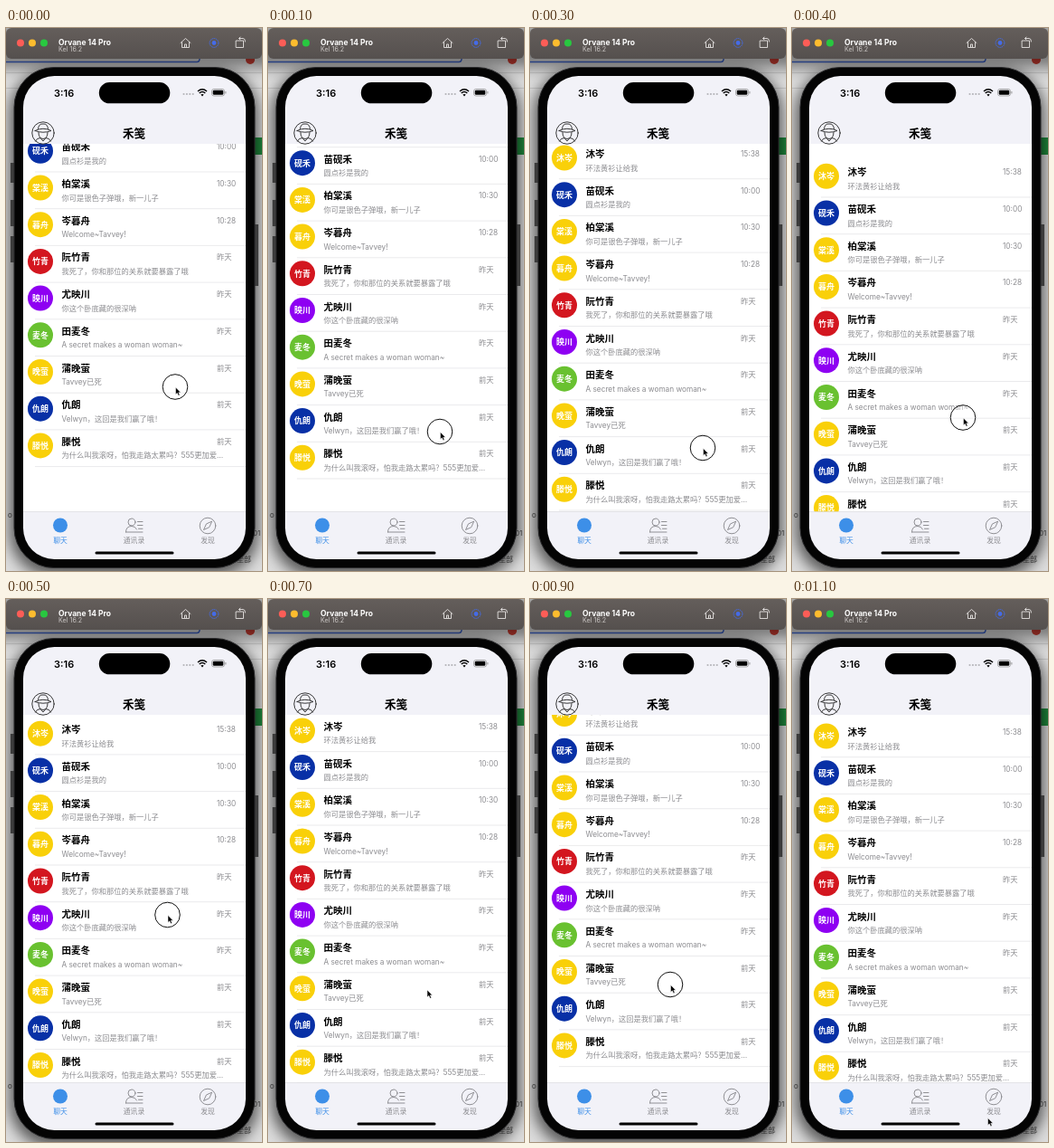
An HTML page for the animation above (1.2 s loop, 283 px wide and 600 px high).

```html
<!DOCTYPE html>
<html lang="zh-CN">
<head>
<meta charset="utf-8">
<style>
html, body { margin: 0; width: 100%; height: 100%; overflow: hidden; background: #ddd; }
svg { display: block; width: 283px; height: 600px; font-family: Inter, "Noto Sans CJK SC", "Noto Sans CJK", sans-serif; }
.name { font-size: 10.5px; font-weight: 700; }
.note, .when { font-size: 8.25px; fill: #8b8b8f; }
.badge { font-size: 9px; font-weight: 700; fill: #fff; text-anchor: middle; }
.tab { font-size: 7.8px; text-anchor: middle; fill: #8e8e92; }
.line { fill: none; stroke-width: .9; stroke-linecap: round; stroke-linejoin: round; }
</style>
</head>
<body>
<svg viewBox="0 0 283 600">
  <defs>
    <filter id="blur" x="-20%" y="-50%" width="140%" height="200%"><feGaussianBlur stdDeviation="8"/></filter>
    <clipPath id="screen"><rect x="19" y="53" width="246" height="534" rx="34.5"/></clipPath>
    <clipPath id="view"><rect x="19" y="128" width="246" height="406.5"/></clipPath>
    <linearGradient id="bar" x2="0" y2="1"><stop stop-color="#645e5b"/><stop offset="1" stop-color="#55504e"/></linearGradient>
  </defs>

  <!-- desktop behind the phone -->
  <rect width="283" height="600" fill="#dcdcdc"/>
  <path d="M0 37.5H211Q214 37.5 214 34" fill="none" stroke="#3d63c9" stroke-width="1.5"/>
  <circle cx="270" cy="35" r="5" fill="#c0392f"/>
  <path d="M0 49.5H283M0 66.5H283" stroke="#c4c4c4"/>
  <rect x="274" y="121" width="9" height="19" fill="#1f8a3d"/>
  <rect x="-20" y="0" width="323" height="44" opacity=".45" filter="url(#blur)"/>
  <rect x="4" y="46" width="275" height="560" rx="48" opacity=".6" filter="url(#blur)"/>
  <g font-size="8" fill="#333">
    <text x="2" y="541">o</text>
    <text x="255" y="590">全部</text>
    <text x="273" y="561">01</text>
  </g>

  <!-- window bar -->
  <rect width="283" height="34" rx="6" fill="url(#bar)"/>
  <circle cx="16" cy="16.5" r="4" fill="#fc5d57"/>
  <circle cx="29" cy="16.5" r="4" fill="#fdbc2e"/>
  <circle cx="42" cy="16.5" r="4" fill="#28c840"/>
  <text x="58" y="18.5" font-size="8.5" font-weight="700" fill="#fff">Orvane 14 Pro</text>
  <text x="58" y="25.5" font-size="7.2" fill="#c9c5c3">Kel 16.2</text>
  <g class="line" stroke="#e6e3e1">
    <path d="M193 16.5L198.5 11.5L204 16.5M194.5 15.5V21.5H202.5V15.5M197.5 21V18H199.5V21"/>
    <path d="M254.5 14H262.5V21.5H254.5ZM257.5 11.5H262Q264.5 11.5 264.5 15M259 10L257.5 11.5L259 13"/>
  </g>
  <circle cx="230" cy="16.5" r="4.9" fill="none" stroke="#456be8" stroke-dasharray="1.6 .6"/>
  <circle cx="230" cy="16.5" r="2.4" fill="#456be8"/>

  <!-- phone body -->
  <path d="M7 149V171M7 190V219M7 230V259M277 217V285" stroke="#3c3c3c" stroke-width="4"/>
  <rect x="9" y="43.5" width="266" height="553" rx="44" fill="#040404" stroke="#2c2c2e"/>

  <g clip-path="url(#screen)">
    <rect x="19" y="53" width="246" height="534" fill="#f2f2f8"/>
    <rect x="19" y="128" width="246" height="406.5" fill="#fff"/>
    <g clip-path="url(#view)"><g id="list"></g></g>

    <!-- status and title -->
    <rect x="102.8" y="60" width="78.5" height="23.3" rx="11.6"/>
    <text x="53" y="75.5" font-size="11" font-weight="600">3:16</text>
    <g fill="#b4b4b9">
      <circle cx="196.5" cy="73" r="1.1"/><circle cx="199.9" cy="73" r="1.1"/>
      <circle cx="203.3" cy="73" r="1.1"/><circle cx="206.7" cy="73" r="1.1"/>
    </g>
    <path d="M212 70Q217 65.5 222 70M213.7 72Q217 69 220.3 72" fill="none" stroke="#000" stroke-width="1.5"/>
    <path d="M215.3 73.5Q217 72.3 218.7 73.5L217 75.5Z"/>
    <rect x="227.5" y="67.5" width="14" height="7.5" rx="2.3" fill="none" stroke="#999" stroke-width=".8"/>
    <rect x="228.7" y="68.7" width="11.6" height="5.1" rx="1.3"/>
    <path d="M242.9 70V72.5" stroke="#999"/>
    <text x="141.5" y="120.5" font-size="12.6" font-weight="700" text-anchor="middle">禾笺</text>
    <g class="line" stroke="#222">
      <circle cx="41" cy="116" r="12.2" fill="#f2f2f8"/>
      <path d="M32 113.5Q41 109 50 113.5Q41 117 32 113.5M35.5 111.5Q36 105.5 41 106Q46 105.5 46.5 111.5M36 115.5Q36 122 41 122.5Q46 122 46 115.5M32.5 125Q34 121.5 38 121.5L41 125L44 121.5Q48 121.5 49.5 125"/>
    </g>

    <!-- tabs -->
    <path d="M19 534.5H265" stroke="#d6d6da" stroke-width=".6"/>
    <circle cx="60" cy="549.5" r="8" fill="#3d8fe8"/>
    <g class="line" stroke="#858589">
      <circle cx="139" cy="546" r="4"/>
      <path d="M132.5 557Q132.5 550.5 139 550.5Q143 550.5 144.5 554M132.5 557H151M145.5 545.5H151M145.5 549.5H151M146.5 553.3H151"/>
      <circle cx="223" cy="550" r="8.8"/>
      <path d="M227.5 545.5L224.7 551.7L218.5 554.5L221.3 548.3Z"/>
    </g>
    <text class="tab" x="60" y="569" style="fill:#3d8fe8">聊天</text>
    <text class="tab" x="141.5" y="569">通讯录</text>
    <text class="tab" x="223" y="569">发现</text>
    <rect x="98.5" y="578.5" width="87" height="3" rx="1.5"/>
  </g>

  <g id="pointer">
    <circle id="ring" r="13.8" fill="#fff" fill-opacity=".35" stroke="#111"/>
    <path d="M.5 .5V8.5L2.3 6.8L3.7 9.8L5.1 9.1L3.8 6.3H6.2Z" stroke="#fff" stroke-width=".5"/>
  </g>
</svg>
<script>
const ROW = 40.7, STEP = 100;
const yellow = '#f9d009', blue = '#0830a6', red = '#d3161f', purple = '#8e00f2', green = '#69c130';
const chats = [
  ['沐岑', '环法黄衫让给我', '15:38', yellow],
  ['苗砚禾', '圆点衫是我的', '10:00', blue],
  ['柏棠溪', '你可是银色子弹哦，新一儿子', '10:30', yellow],
  ['岑暮舟', 'Welcome~Tavvey!', '10:28', yellow],
  ['阮竹青', '我死了，你和那位的关系就要暴露了哦', '昨天', red],
  ['尤映川', '你这个卧底藏的很深呐', '昨天', purple],
  ['田麦冬', 'A secret makes a woman woman~', '昨天', green],
  ['蒲晚萤', 'Tavvey已死', '前天', yellow],
  ['仇朗', 'Velwyn，这回是我们赢了哦！', '前天', blue],
  ['滕悦', '为什么叫我滚呀，怕我走路太累吗？555更加爱…', '前天', yellow]
];
const get = id => document.getElementById(id);

get('list').innerHTML = chats.map(([name, note, when, color], i) => `
  <g transform="translate(0 ${i * ROW})">
    <circle cx="38" cy="17.5" r="14" fill="${color}"/>
    <text class="badge" x="38" y="20.9">${name.slice(-2)}</text>
    <text class="name" x="61.5" y="17">${name}</text>
    <text class="note" x="61.5" y="31.6">${note}</text>
    <text class="when" x="233" y="16">${when}</text>
    <path d="M32 ${ROW}H265" stroke="#dcdce0" stroke-width=".6"/>
  </g>`).join('');

// One pose per step: list top, pointer x, pointer y, pressed
const poses = [
  [77.6, 187, 396.5, 1], [91, 190, 446, 1], [104.7, 192, 494, 1], [126, 191, 464, 1],
  [146.3, 189, 430.5, 1], [131.2, 178.5, 349, 1], [129, 177, 392, 0], [127.9, 175.5, 431.5, 0],
  [118, 165, 429, 1], [109.6, 155, 426, 1], [122, 186, 500, 1], [134, 216, 573, 0]
];

function draw(time) {
  const [top, x, y, pressed] = poses[Math.floor(time / STEP) % poses.length];
  get('list').setAttribute('transform', `translate(0 ${top})`);
  get('pointer').setAttribute('transform', `translate(${x} ${y})`);
  get('ring').setAttribute('visibility', pressed ? 'visible' : 'hidden');
}

const start = performance.now();
function tick() {
  draw(performance.now() - start);
  requestAnimationFrame(tick);
}
tick();
</script>
</body>
</html>
```
